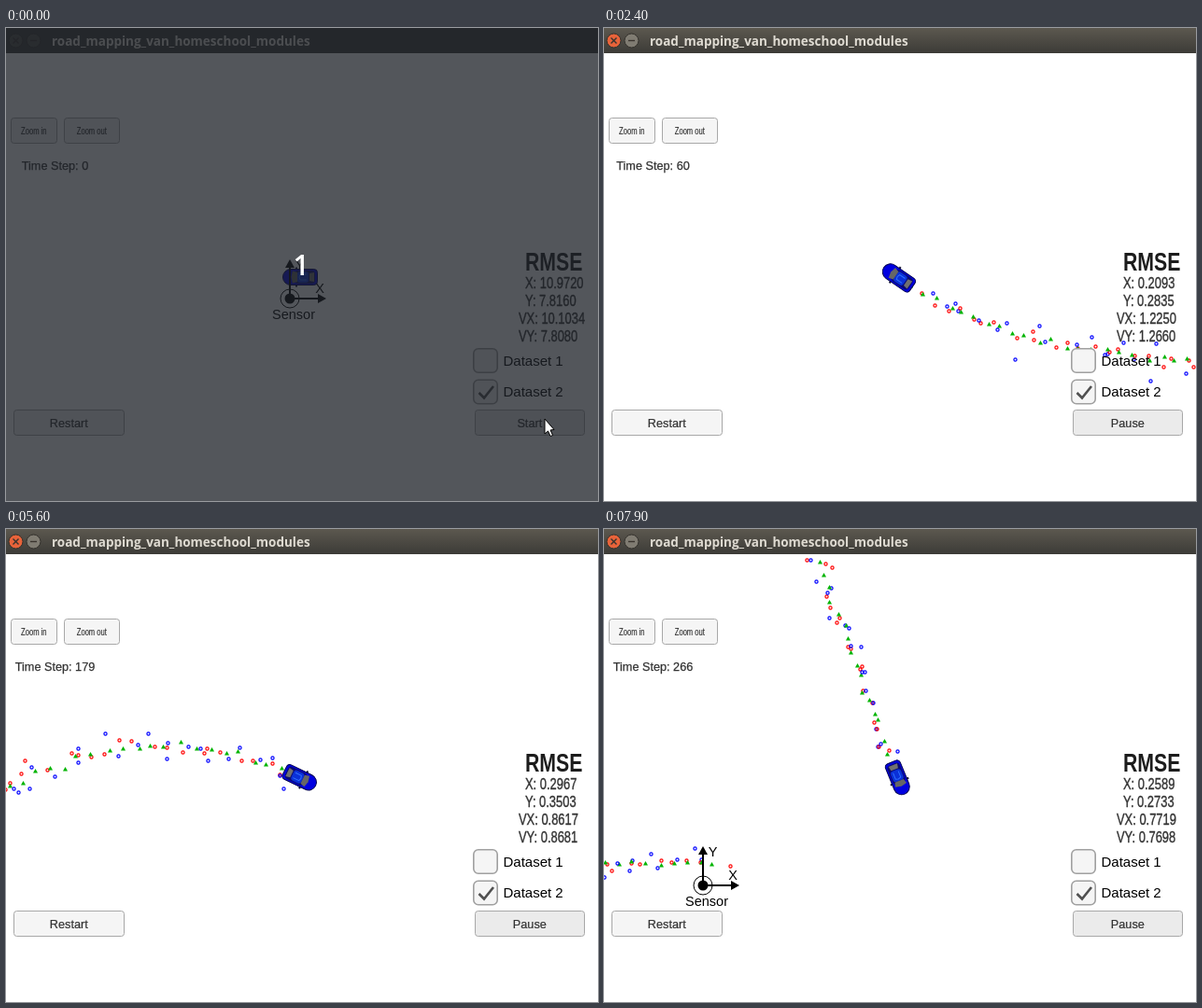
Write an HTML page with a canvas that moves like this. It is 634 px wide and 507 px high and loops after 8 s.

```html
<!DOCTYPE html>
<html>
<head>
<meta charset="utf-8">
<style>
html, body { margin: 0; width: 100%; height: 100%; overflow: hidden; background: #fff; }
canvas { display: block; }
</style>
</head>
<body>
<canvas id="stage" width="634" height="507"></canvas>
<script>
const ctx = document.getElementById('stage').getContext('2d');
const SANS = '"Liberation Sans", Arial, sans-serif';
const TITLE_FONT = '"Open Sans", sans-serif';
const CAR = { x: 315, y: 267 };
const LAST_STEP = 266;
const GREEN = '#00b400', RED = '#f00', BLUE = '#00f';

// Simulation step reached at a time in ms
const PACE = [[900, 0], [1600, 29], [3200, 91], [4300, 130], [5600, 179], [6500, 210], [7900, LAST_STEP]];

function stepAt(t) {
  const i = Math.max(1, PACE.findIndex(([time]) => time >= t));
  const [t0, s0] = PACE[i - 1], [t1, s1] = PACE[i];
  return Math.max(0, Math.round(s0 + (s1 - s0) * (t - t0) / (t1 - t0)));
}

// One clockwise turn from left through up and right to down, quickest half way
const heading = s => (180 + 251 * (1 - Math.cos(Math.PI * s / 248)) / 2) * Math.PI / 180;
const speed = s => 7.65 - .45 * Math.cos(2 * Math.PI * s / 248);

const route = [{ x: 0, y: 0 }];
for (let s = 0; s < LAST_STEP; s++) {
  const { x, y } = route[s], angle = heading(s + .5), d = speed(s + .5);
  route.push({ x: x + d * Math.cos(angle), y: y + d * Math.sin(angle) });
}

let seed = 7;
const random = () => (seed = (seed * 16807) % 2147483647) / 2147483647;
const noise = () => Math.sqrt(-2 * Math.log(random())) * Math.cos(2 * Math.PI * random());

const markers = [];
route.forEach(({ x, y }, s) => {
  const add = (color, spread) =>
    markers.push({ s, color, x: x + spread * noise(), y: y + spread * noise() });
  if (s % 2) add(BLUE, 8.5);
  else {
    add(RED, 4.5);
    add(GREEN, 2.2);
  }
});

function errorsAt(step) {
  if (!step) return { X: 10.972, Y: 7.816, VX: 10.1034, VY: 7.808 };
  const u = step / 135, root = Math.sqrt(step);
  return {
    X: .253 + .064 * Math.cos(2 * Math.PI * (step - 210) / 238),
    Y: .366 * u * Math.exp(1 - u),
    VX: .362 + 6.685 / root,
    VY: .321 + 7.32 / root
  };
}

function text(str, x, y, size, options = {}) {
  const { color = '#323232', align = 'left', weight = 'normal', squash = 1, font = SANS, ink = 0 } = options;
  ctx.save();
  ctx.translate(x, y);
  ctx.scale(squash, 1);
  ctx.font = `${weight} ${size}px ${font}`;
  ctx.textAlign = align;
  ctx.fillStyle = ctx.strokeStyle = color;
  ctx.fillText(str, 0, 0);
  if (ink) {
    ctx.lineWidth = ink;
    ctx.strokeText(str, 0, 0);
  }
  ctx.restore();
}

function paint(fill, stroke, width = 1) {
  if (fill) {
    ctx.fillStyle = fill;
    ctx.fill();
  }
  if (stroke) {
    ctx.strokeStyle = stroke;
    ctx.lineWidth = width;
    ctx.stroke();
  }
}

function box(x, y, w, h, r, fill, stroke, width) {
  ctx.beginPath();
  ctx.roundRect(x, y, w, h, r);
  paint(fill, stroke, width);
}

function disc(x, y, r, fill, stroke, width) {
  ctx.beginPath();
  ctx.arc(x, y, r, 0, 7);
  paint(fill, stroke, width);
}

function lines(points, color, width) {
  ctx.beginPath();
  points.forEach(([x, y]) => ctx.lineTo(x, y));
  paint(null, color, width);
}

function polygon(points, fill, stroke) {
  ctx.beginPath();
  points.forEach(([x, y]) => ctx.lineTo(x, y));
  ctx.closePath();
  paint(fill, stroke);
}

function drawMarker({ x, y, color }) {
  x = Math.round(x) + .5;
  y = Math.round(y) + .5;
  if (color === GREEN) polygon([[x - 2.5, y + 2], [x, y - 2.5], [x + 2.5, y + 2]], color);
  else disc(x, y, 1.6, null, color, 1.2);
}

function drawSensor(x, y) {
  ctx.save();
  ctx.translate(x, y);
  lines([[0, -36], [0, 0], [34, 0]], '#000', 2);
  polygon([[-5, -33], [0, -42], [5, -33]], '#000');
  polygon([[30, -5], [39, 0], [30, 5]], '#000');
  disc(0, 0, 10, null, '#000');
  disc(0, 0, 5.5, '#000');
  const black = { color: '#000', align: 'center' };
  text('Y', 10.5, -31, 14.5, black);
  text('X', 32, -6, 14.5, black);
  text('Sensor', 4, 21.5, 14.5, black);
  ctx.restore();
}

function drawCar(angle) {
  ctx.save();
  ctx.translate(CAR.x, CAR.y);
  ctx.rotate(angle);
  lines([[4, -10.5], [4, 10.5]], '#101030', 2);
  box(-18.5, -8.5, 37, 17, [4, 9, 9, 4], '#0000e0', '#000050');
  box(-16, -7, 22, 14, 4, '#0a0a70');
  box(-9, -6, 12, 12, 3, '#0a30d8');
  polygon([[3, -5], [8, -6.5], [9.5, 0], [8, 6.5], [3, 5]], '#666');
  polygon([[-15, -5], [-10, -4], [-10, 4], [-15, 5]], '#707070');
  lines([[-7, -3], [0, -3], [1, 0], [0, 3], [-7, 3]], '#3070ff', 1);
  ctx.restore();
}

function drawTitleBar(focused) {
  const shade = ctx.createLinearGradient(0, 0, 0, 27);
  shade.addColorStop(0, focused ? '#5c584f' : '#3c3b37');
  shade.addColorStop(1, '#3c3b37');
  ctx.fillStyle = shade;
  ctx.fillRect(0, 0, 634, 27);
  const idle = '#504e48', rim = '#33312c', mark = '#3a342e';
  disc(10.5, 13.5, 7.5, focused ? '#e8633a' : idle, rim);
  disc(29.5, 13.5, 7.5, focused ? '#807c72' : idle, rim);
  lines([[7.5, 10.5], [13.5, 16.5]], mark, 1.4);
  lines([[13.5, 10.5], [7.5, 16.5]], mark, 1.4);
  lines([[26, 13.5], [33, 13.5]], mark, 1.4);
  text('road_mapping_van_homeschool_modules', 49, 18.5, 13.5, {
    color: '#dfdbd2', weight: 'bold', font: TITLE_FONT
  });
}

function button(label, x, y, w, size, squash = 1, fill = '#f5f5f5') {
  box(x + .5, y + .5, w, 27, 3, fill, '#a8a8a8');
  text(label, x + w / 2 + .3, y + 14 + size * .37, size, { align: 'center', squash, ink: .2 });
}

function checkbox(label, y, checked) {
  box(500.8, y - 12.7, 25.4, 25.4, 5, '#f5f5f5', '#a0a0a0', 1.6);
  if (checked) lines([[506.5, y + 1], [512, y + 6.5], [522, y - 6]], '#505050', 2.6);
  text(label, 532.5, y + 5, 15, { color: '#000' });
}

function drawControls(step) {
  button('Zoom in', 5, 96, 49, 11, .69);
  button('Zoom out', 62, 96, 59, 11, .69);
  button('Restart', 8, 409, 118, 12.7);
  button(step ? 'Pause' : 'Start', 502, 409, 117, 12.7, 1, '#ebebeb');
  checkbox('Dataset 1', 356.5, false);
  checkbox('Dataset 2', 390, true);
  text('Time Step: ' + step, 52.5, 152, 12.7, { align: 'center', ink: .25 });

  text('RMSE', 556, 260, 28, { color: '#1c1c1c', weight: 'bold', squash: .76 });
  Object.entries(errorsAt(step)).forEach(([name, value], i) => {
    const x = name.length > 1 ? 549 : 556;
    text(`${name}: ${value.toFixed(4)}`, x, 279 + 19.1 * i, 17, { squash: .76, ink: .4 });
  });
}

function drawPointer() {
  polygon([[577, 419], [577, 435], [580.5, 432], [583, 437.5], [585.5, 436.5], [583, 431], [587, 430.5]],
    '#fff', '#000');
}

function draw(t) {
  const started = t >= 1000, step = started ? stepAt(t) : 0;
  const dx = Math.round(CAR.x - route[step].x), dy = Math.round(CAR.y - route[step].y);

  ctx.fillStyle = '#fff';
  ctx.fillRect(0, 0, 634, 507);
  if (step) {
    ctx.save();
    ctx.translate(dx, dy);
    markers.filter(m => m.s <= step).forEach(drawMarker);
    ctx.restore();
  }
  drawCar(heading(step));
  drawSensor(dx - 11, dy + 23);
  drawControls(step);
  drawTitleBar(started);

  if (t < 100) {
    ctx.fillStyle = 'rgba(30, 33, 40, .76)';
    ctx.fillRect(0, 0, 634, 507);
    text('1', 316, 264.5, 30, { color: '#fff', weight: 600, align: 'center', font: TITLE_FONT });
  }
  if (t < 1300) drawPointer();
}

function tick() {
  draw(Math.floor(performance.now() % 8000 / 100) * 100);
  requestAnimationFrame(tick);
}
tick();
</script>
</body>
</html>
```
